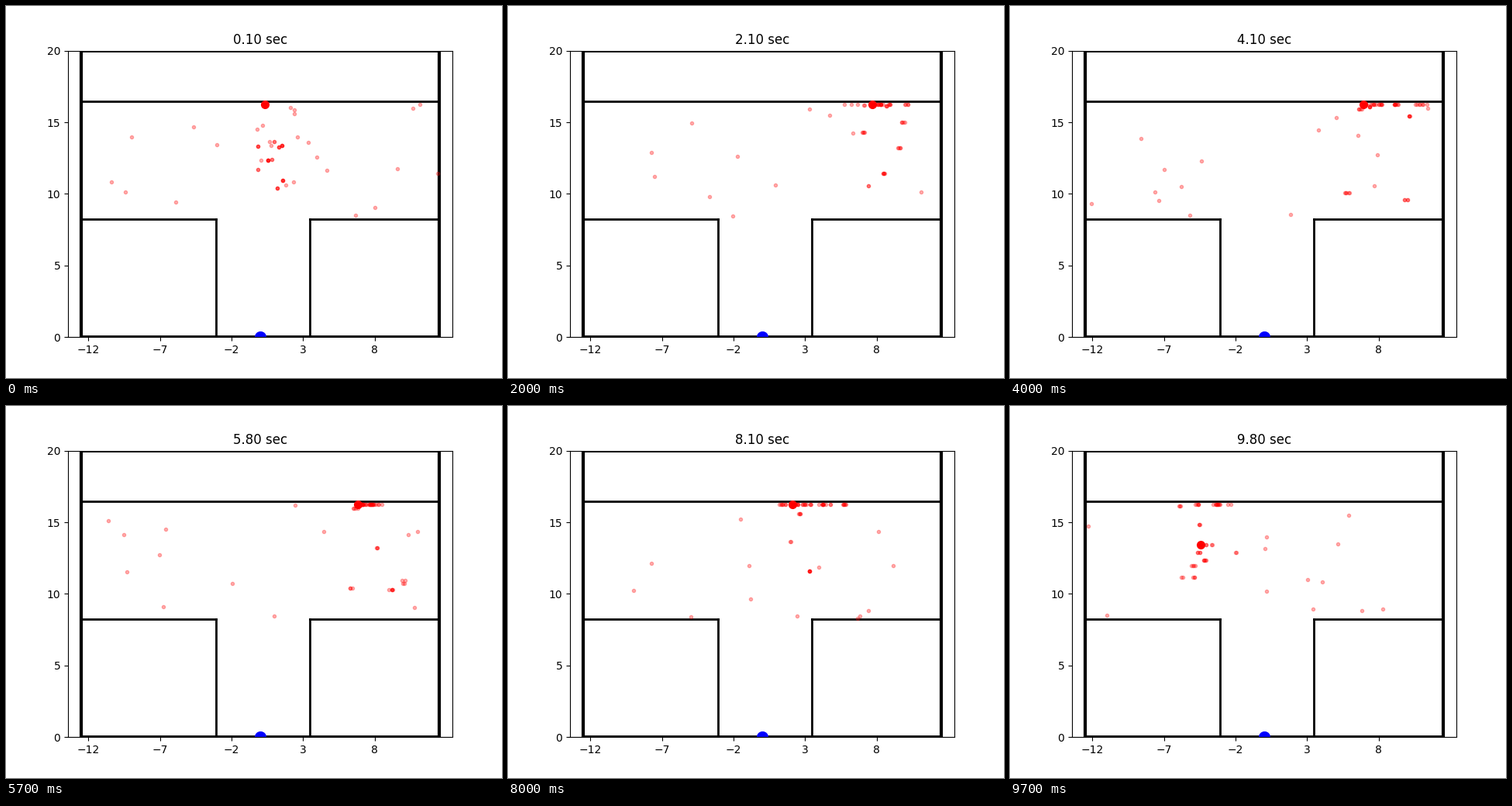
These frames come from a looping animation (640x480 px, 9800 ms). A matplotlib script:

```python
import numpy as np
import matplotlib.pyplot as plt
from matplotlib.animation import FuncAnimation

FRAMES, STEP_MS = 98, 100
HALF_WIDTH = 12.5
CORRIDOR = (8.23, 16.45)
STEM = (-3.06, 3.49)
TOP_ROW = 16.25          # particles pile up here, against the far wall

# The walker goes right, lingers, then turns back
PATH_FRAMES = [0, 20, 40, 57, 71, 89, 97]
PATH_X = [0.33, 7.66, 6.95, 6.82, 6.82, -2.58, -4.46]
DROP_FRAME, DROP_Y = 94, 13.41


def walker_pos(i):
    y = TOP_ROW if i < DROP_FRAME else DROP_Y
    return np.interp(i, PATH_FRAMES, PATH_X), y


def make_clusters():
    """One group of resampled clones is born per frame and lives a while."""
    rng = np.random.default_rng(7)
    clusters = []
    for birth in range(-10, FRAMES):
        on_top = birth > 0 and rng.random() < 0.5
        clusters.append(dict(
            birth=birth,
            death=birth + rng.integers(5, 16),
            offset=rng.normal(0.9, 1.4),
            y=TOP_ROW if on_top else 16.2 - 7.5 * rng.random() ** 1.4,
            width=rng.uniform(0, 1.4 if on_top else 0.5) * (birth > 0),
            clones=rng.integers(3, 8) if on_top else rng.integers(2, 6),
        ))
    return clusters


CLUSTERS = make_clusters()


def particles(i):
    rng = np.random.default_rng(40 + i)
    x, y = walker_pos(i)
    points = []

    # Clusters keep their height and are carried along with the walker
    for c in CLUSTERS:
        if c["birth"] <= i < c["death"]:
            left = x + c["offset"] + rng.normal(0, 0.08)
            points += [(left + c["width"] * u, c["y"])
                       for u in rng.random(c["clones"])]

    # Clones trailing the best particle, once the filter has settled
    points += [(x + u, y) for u in rng.uniform(0, 1, min(i, 8))]

    # The first cloud is still loose
    loose = max(0, 14 - 2 * i)
    points += zip(rng.normal(x + 0.9, 1.7, loose),
                  rng.uniform(10, 16, loose))

    # Freshly drawn particles all over the corridor
    fresh = rng.integers(12, 16)
    points += zip(rng.uniform(-HALF_WIDTH, HALF_WIDTH, fresh),
                  rng.uniform(*CORRIDOR, fresh))

    xs, ys = np.array(points).T
    return (np.clip(xs, -HALF_WIDTH, HALF_WIDTH),
            np.clip(ys, CORRIDOR[0], TOP_ROW))


fig, ax = plt.subplots(figsize=(6.4, 4.8), dpi=100)
scale = 369.6 / 20       # pixels per unit, equal on both axes
ax.set_xlim(-248 / scale, 248 / scale)
ax.set_ylim(0, 20)
ax.set_xticks(range(-12, 12, 5))
ax.set_yticks(range(0, 21, 5))


def wall(xs, ys, width=2):
    ax.plot(xs, ys, color="black", lw=width)


low, high = CORRIDOR
for side, corner in zip((-HALF_WIDTH, HALF_WIDTH), STEM):
    wall([side, side], [0, 20], 3)
    wall([side, corner], [low, low])
    wall([corner, corner], [low, 0])
for level in (0.05, high, 20):
    wall([-HALF_WIDTH, HALF_WIDTH], [level, level])

ax.plot(0, 0, "o", color="blue", ms=10)
cloud, = ax.plot([], [], ".", color="red", ms=6, alpha=0.3)
walker, = ax.plot([], [], "o", color="red", ms=7)
title = ax.set_title("")


def update(i):
    cloud.set_data(*particles(i))
    x, y = walker_pos(i)
    walker.set_data([x], [y])
    title.set_text(f"{(i + 1) / 10:.2f} sec")
    return cloud, walker, title


anim = FuncAnimation(fig, update, frames=FRAMES, interval=STEP_MS,
                     repeat=True, repeat_delay=0)
plt.show()
```
